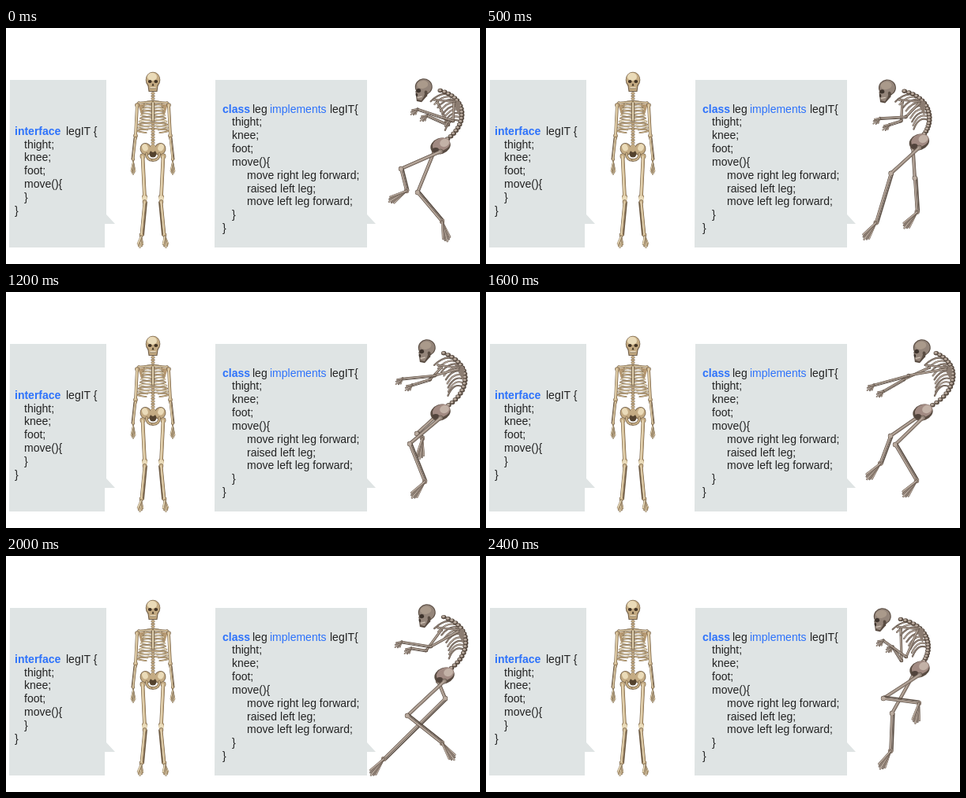
These frames come from a looping animation (600x300 px, 2500 ms). An HTML page with a canvas:

```html
<!DOCTYPE html>
<html lang="en">
<head>
<meta charset="utf-8">
<style>
  html, body { margin: 0; width: 600px; height: 300px; overflow: hidden; background: #fff; }
  svg, canvas { position: absolute; left: 0; top: 0; }
  text { font: 14px "Liberation Sans", Arial, sans-serif; fill: #222; white-space: pre; }
  .key { fill: #2d72fb; }
  .bold { font-weight: bold; }
</style>
</head>
<body>
<svg width="600" height="300">
  <path fill="#dfe4e4" d="M5 66H127V237L138 249H125V279H4ZM265 66H457V237L468 249H457V279H264Z"/>
  <text y="136"><tspan x="11" class="key bold">interface</tspan><tspan x="76">legIT {</tspan></text>
  <text x="23" y="153">thight;</text>
  <text x="23" y="169">knee;</text>
  <text x="23" y="186">foot;</text>
  <text x="23" y="203">move(){</text>
  <text x="23" y="220">}</text>
  <text x="11" y="237">}</text>
  <text y="108"><tspan x="274" class="key bold">class</tspan><tspan x="312">leg</tspan><tspan x="334" class="key">implements</tspan><tspan x="410">legIT{</tspan></text>
  <text x="286" y="124">thight;</text>
  <text x="286" y="141">knee;</text>
  <text x="286" y="158">foot;</text>
  <text x="286" y="175">move(){</text>
  <text x="305" y="192">move right leg forward;</text>
  <text x="305" y="209">raised left leg;</text>
  <text x="305" y="225">move left leg forward;</text>
  <text x="286" y="242">}</text>
  <text x="274" y="259">}</text>
</svg>
<canvas id="stage" width="600" height="300"></canvas>
<script>
const c = document.getElementById("stage").getContext("2d");
c.lineCap = c.lineJoin = "round";
const ivory = { dark: "#6f5c45", mid: "#c4ab83", light: "#eadbb9" };
const umber = { dark: "#594c42", mid: "#94857a", light: "#b9aa9e" };
let tone;

const add = (p, x, y) => [p[0] + x, p[1] + y];
const polar = (p, deg, r) => add(p, r * Math.cos(deg * Math.PI / 180), r * Math.sin(deg * Math.PI / 180));

function line(color, width, a, b, ctrl) {
  c.strokeStyle = color;
  c.lineWidth = width;
  c.beginPath();
  c.moveTo(...a);
  if (ctrl) c.quadraticCurveTo(...ctrl, ...b); else c.lineTo(...b);
  c.stroke();
}

function oval(color, p, rx, ry, turn = 0) {
  c.fillStyle = color;
  c.beginPath();
  c.ellipse(p[0], p[1], rx, ry, turn, 0, 7);
  c.fill();
}

function shape(color, points) {
  c.fillStyle = color;
  c.beginPath();
  points.forEach(p => c.lineTo(...p));
  c.fill();
}

function bone(a, b, width) {
  line(tone.dark, width + 1, a, b);
  for (const p of [a, b]) oval(tone.dark, p, width * .85 + .4, width * .85 + .4);
  line(tone.mid, width, a, b);
  for (const p of [a, b]) oval(tone.mid, p, width * .8, width * .8);
  line(tone.light, width * .45, add(a, -.4, 0), add(b, -.4, 0));
}

// Two parallel bones, as in a shin or forearm
function pair(a, b, gap, width) {
  const len = Math.hypot(b[0] - a[0], b[1] - a[1]) || 1;
  const x = (b[1] - a[1]) / len * gap, y = (a[0] - b[0]) / len * gap;
  line(tone.dark, width * .6, add(a, x, y), add(b, x, y));
  bone(a, b, width);
}

function fan(p, angle, length, spread, width) {
  for (let i = -2; i <= 2; i++) {
    const tip = polar(p, angle + i * spread, length - Math.abs(i) * 2);
    line(tone.dark, width + .7, p, tip);
    line(i % 2 ? tone.mid : tone.light, width, p, tip);
  }
}

function drawFront() {
  tone = ivory;
  const at = (x, y) => [186 + x, y];
  for (let y = 83; y < 152; y += 3.5) {
    oval(tone.dark, at(0, y), 2.6, 1.8);
    oval(tone.mid, at(0, y), 2.1, 1.2);
  }
  for (const s of [-1, 1]) {
    shape("#b89b74", [at(s * 10, 96), at(s * 19, 97), at(s * 14, 113)]);
    for (let i = 0; i < 10; i++) {
      const y = 94 + i * 3.9, w = 10 + 7.5 * Math.sin((i + 1) / 6.5);
      const end = at(s * (i < 6 ? 2 : i * 1.5 - 5), y + 4);
      line(tone.dark, 1.9, at(s * 2, y - 1), end, at(s * w * 1.9, y + 1));
      line(i % 2 ? tone.mid : tone.light, 1.2, at(s * 2, y - 1), end, at(s * w * 1.9, y + 1));
    }
    bone(at(s * 2, 94), at(s * 18, 95), 1.6);
    bone(at(s * 20, 98), at(s * 22, 137), 2.8);
    pair(at(s * 22, 140), at(s * 25, 167), s * 2, 1.8);
    fan(at(s * 25, 170), 90, 16, 6, 1);
    oval(tone.dark, at(s * 9, 154), 7.2, 8.2, s * .4);
    oval(tone.mid, at(s * 9, 154), 6.4, 7.3, s * .4);
    oval(tone.light, at(s * 10, 152), 3.6, 4.5, s * .4);
    line(tone.dark, 3.5, at(s * 8, 160), at(0, 168), at(s * 8, 168));
    line(tone.mid, 2.3, at(s * 8, 160), at(0, 168), at(s * 8, 168));
    bone(at(s * 13, 163), at(s * 10.5, 215), 3.6);
    oval(tone.light, at(s * 10.5, 217), 3.4, 3.4);
    pair(at(s * 10.5, 221), at(s * 14.5, 263), s * -2.6, 2.8);
    fan(at(s * 15, 265), 90 - s * 6, 14, 9, 1.6);
  }
  line(tone.dark, 3, at(0, 95), at(0, 117));
  line(tone.light, 1.8, at(0, 95), at(0, 117));
  oval("#54432f", at(0, 160), 4.5, 4.5);
  oval(tone.mid, at(0, 153), 3.5, 5);

  oval(tone.dark, at(0, 66), 9.3, 10.2);
  shape(tone.dark, [at(-7, 70), at(7, 70), at(5.5, 81), at(-5.5, 81)]);
  oval(tone.mid, at(0, 65.5), 8.6, 9.3);
  oval(tone.light, at(-1, 62), 6, 5);
  shape(tone.mid, [at(-6, 70), at(6, 70), at(4.5, 80), at(-4.5, 80)]);
  for (const s of [-1, 1]) oval("#423425", at(s * 3.8, 68), 2.4, 2.1);
  shape("#423425", [at(0, 70), at(1.5, 73.5), at(-1.5, 73.5)]);
  line("#f3e9d2", 1.5, at(-3, 76), at(3, 76));
  line(tone.dark, .7, at(-3.5, 77), at(3.5, 77));
}

// Each pose: head, chest, pelvis, knee and ankle of both legs, elbow, hand, foot angles
const times = [0, 300, 800, 1200, 1600, 2000, 2400];
const poses = [
  [527,77, 560,104, 547,148, 500,179, 507,207, 521,209, 552,246, 566,118, 521,103, 148, 75],
  [511,77, 545,104, 545,143, 517,184, 480,247, 566,200, 544,259, 532,114, 502,111, 130, 155],
  [499,80, 535,104, 546,143, 506,186, 514,248, 508,177, 548,196, 531,111, 494,120, 118, 88],
  [531,73, 565,106, 547,151, 511,193, 530,241, 520,180, 527,186, 543,106, 502,110, 128, 97],
  [550,73, 575,106, 550,151, 518,194, 545,240, 512,183, 499,218, 535,106, 491,118, 130, 130],
  [531,74, 565,104, 552,150, 508,203, 552,238, 556,181, 478,258, 538,115, 501,109, 54, 128],
  [500,79, 539,103, 546,142, 503,181, 548,187, 514,200, 512,248, 532,128, 503,107, 100, 120]
];

function poseAt(t) {
  let i = 0;
  while (i < times.length - 2 && t >= times[i + 1]) i++;
  const k = (t - times[i]) / (times[i + 1] - times[i]);
  return poses[i].map((v, j) => v + (poses[i + 1][j] - v) * k);
}

function skullSide(p) {
  c.save();
  c.translate(...p);
  c.rotate(-.12);
  shape(tone.dark, [[-9, 2], [6, 3], [5, 10], [-3, 17], [-9, 15]]);
  oval(tone.dark, [2, -2], 11, 10.5);
  oval(tone.mid, [2, -2], 10, 9.6);
  oval("#aa9a8b", [1, -5], 7, 5);
  shape(tone.mid, [[-8, 3], [3, 4], [1, 10], [-3, 15], [-8, 13]]);
  oval("#3e342d", [-5, 2], 2.9, 2.6);
  oval("#3e342d", [-8, 7], 1.3, 2);
  line("#d2c5b8", 1.3, [-7, 10.5], [-2, 10]);
  oval(tone.dark, [4, 6], 2, 3);
  c.restore();
}

function leg(hip, knee, ankle, angle) {
  bone(hip, knee, 3.3);
  pair(knee, ankle, 2.8, 2.6);
  oval(tone.light, knee, 2.6, 2.6);
  oval(tone.mid, ankle, 3.2, 3.2);
  fan(ankle, angle, 26, 6, 1.7);
}

function arm(shoulder, elbow, hand) {
  bone(shoulder, elbow, 2.2);
  pair(elbow, hand, 2, 1.6);
  fan(hand, 140, 11, 15, 1.1);
}

function drawWalker(t) {
  tone = umber;
  const v = poseAt(t);
  const [head, chest, hips, kneeA, ankleA, kneeB, ankleB, elbow, hand] =
    Array.from({ length: 9 }, (_, i) => [v[2 * i], v[2 * i + 1]]);
  const c1 = add(chest, 30, -28), c2 = add(chest, 30, 25);
  const spine = u => [0, 1].map(i =>
    (1 - u) ** 3 * head[i] + 3 * u * (1 - u) ** 2 * c1[i] + 3 * u * u * (1 - u) * c2[i] + u ** 3 * hips[i]);

  arm(add(chest, -14, -10), add(elbow, -6, 5), add(hand, 12, 8));
  leg(add(hips, -5, 9), kneeB, ankleB, v[19]);

  for (let i = 0; i < 9; i++) {
    const p = spine(.27 + i * .047), end = add(p, -27 + i * .9, 7 + i * .5);
    line(tone.dark, 2.2, p, end, add(p, -13, -7));
    line(i % 2 ? tone.light : tone.mid, 1.2, p, end, add(p, -13, -7));
  }
  for (let u = .14; u < 1; u += .042) {
    const p = spine(u);
    oval(tone.dark, p, 3.3, 2.7);
    oval(tone.light, add(p, -.5, -.5), 1.9, 1.5);
  }
  shape("#8b7c71", [add(chest, 2, -15), add(chest, 15, -10), add(chest, 14, 8)]);
  bone(add(chest, -18, -13), add(chest, 8, -10), 1.5);

  oval(tone.dark, add(hips, 3, 2), 13, 10, -.35);
  oval("#a18a82", add(hips, 4, 0), 11.5, 8, -.35);
  oval("#c3b2a7", add(hips, 8, -2), 6, 5, -.35);
  oval("#51443c", add(hips, -3, 7), 4, 3);

  leg(add(hips, 3, 9), kneeA, ankleA, v[18]);
  arm(add(chest, 7, -8), elbow, hand);
  skullSide(head);
}

function frame(now) {
  c.clearRect(0, 0, 600, 300);
  drawFront();
  drawWalker(Math.floor(now % 2500 / 100) * 100);
  requestAnimationFrame(frame);
}
frame(0);
</script>
</body>
</html>
```
